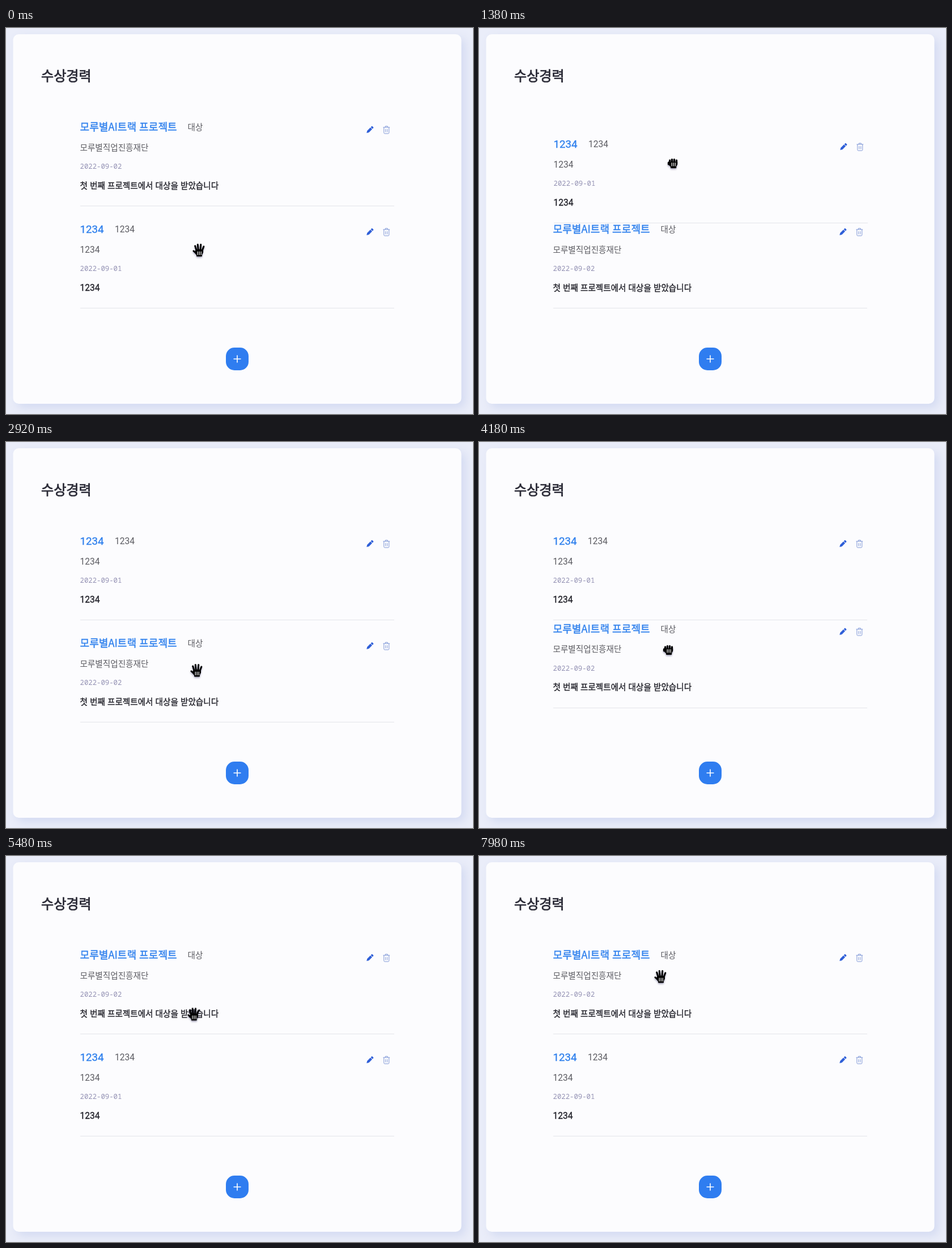
Recreate the animation shown at these times as an HTML page. Size 824 by 680 pixels, loop 8000 ms.

```html
<!DOCTYPE html>
<html lang="ko">
<head>
<meta charset="utf-8">
<title>수상경력</title>
<style>
html, body { margin: 0; width: 100%; height: 100%; overflow: hidden; background: #eaedf9; }
svg { display: block; width: 824px; height: 680px; }
.card { fill: #fcfcfe; filter: drop-shadow(7px 7px 8px #d3daf1); }

text { font-family: "Noto Sans CJK KR", "Noto Sans CJK", sans-serif; font-size: 14.6px; stroke-width: .35px; }
.heading { font-size: 24.1px; fill: #2c2c38; stroke: #2c2c38; stroke-width: .8px; }
.title { font-size: 18.1px; fill: #2f80ed; stroke: #2f80ed; }
.label { fill: #5b5b61; }
.date { font-family: "Noto Sans Mono", monospace; font-size: 12.3px; fill: #9492b4; }
.body { fill: #22222a; stroke: #22222a; }
.digits .label, .digits .body { font-family: Roboto, sans-serif; font-size: 15.6px; }
.digits .title { font-family: Roboto, sans-serif; font-size: 18.7px; }
.rule { stroke: #e4e5ea; }

.first { animation: first 8s infinite; }
.second { animation: second 8s infinite; }
.hand { animation: hand 8s infinite; }
.open { animation: open 8s step-end infinite; }
.fist { animation: fist 8s step-end infinite; }

@keyframes first {
  0% { transform: translate(0, 0); }
  10.9% { transform: translate(0, 0); animation-timing-function: cubic-bezier(.2, 0, 0, 1); }
  13.4% { transform: translate(0, 180px); }
  47.5% { transform: translate(0, 180px); animation-timing-function: ease-in; }
  52.25% { transform: translate(0, 155px); animation-timing-function: linear; }
  61% { transform: translate(0, 37.5px); animation-timing-function: ease-out; }
  65%, 100% { transform: translate(0, 0); }
}
@keyframes second {
  0% { transform: translate(0, 180px); }
  4.4% { transform: translate(0, 180px); animation-timing-function: ease-in-out; }
  17.25% { transform: translate(1px, 30px); }
  20% { transform: translate(1px, 30px); animation-timing-function: cubic-bezier(.2, 1, .1, 1); }
  23.75% { transform: translate(0, 0); }
  58.96% { transform: translate(0, 0); animation-timing-function: cubic-bezier(.2, 0, 0, 1); }
  61.46%, 100% { transform: translate(0, 180px); }
}
@keyframes hand {
  0% { transform: translate(340px, 391px); }
  4.4% { transform: translate(340px, 391px); animation-timing-function: ease-in-out; }
  17.25% { transform: translate(342px, 238px); }
  24% { transform: translate(342px, 238px); animation-timing-function: ease-in-out; }
  36.5% { transform: translate(336px, 402px); animation-timing-function: ease-in-out; }
  44% { transform: translate(333px, 391px); }
  47.5% { transform: translate(333px, 391px); animation-timing-function: ease-in; }
  52.25% { transform: translate(334px, 366px); animation-timing-function: linear; }
  61% { transform: translate(334px, 265px); }
  65% { transform: translate(334px, 265px); animation-timing-function: ease-in-out; }
  78.5% { transform: translate(311px, 360px); animation-timing-function: ease-in-out; }
  99.75%, 100% { transform: translate(320px, 212px); }
}
@keyframes open {
  0% { visibility: visible; }
  4% { visibility: hidden; }
  20.5% { visibility: visible; }
  46.5% { visibility: hidden; }
  62% { visibility: visible; }
}
@keyframes fist {
  0% { visibility: hidden; }
  4% { visibility: visible; }
  20.5% { visibility: hidden; }
  46.5% { visibility: visible; }
  62% { visibility: hidden; }
}
.hand { filter: drop-shadow(0 2px 1.5px rgba(40, 35, 90, .4)); stroke-linecap: round; stroke-linejoin: round; }
.hand .slots { stroke: #fff; stroke-width: 1.2; }
</style>
</head>
<body>
<svg viewBox="0 0 824 680">
  <defs>
    <g id="tools">
      <g transform="translate(641.8 179.5) rotate(45)" fill="#2f5fd8">
        <rect x="-2.2" y="-7.8" width="4.4" height="3.2" rx="1.1"/>
        <path d="M-2.2-3.8H2.2V4.2L0 7.8-2.2 4.2Z"/>
      </g>
      <g transform="translate(671.3 179.5)" fill="none" stroke="#7f97d6" stroke-linecap="round">
        <path d="M-5.5-4.5H5.5M-2-4.8V-6.5H2V-4.8M-4.5-4.2V5Q-4.5 6.5-3 6.5H3Q4.5 6.5 4.5 5V-4.2M-1.5-1V3.5M1.5-1V3.5"/>
      </g>
      <path class="rule" d="M131 313.5H685"/>
    </g>
  </defs>

  <rect class="card" x="12.5" y="11" width="791" height="651" rx="10"/>
  <text class="heading" x="62" y="93">수상경력</text>

  <g class="first">
    <text class="title" x="130.5" y="181">모루별AI트랙 프로젝트</text>
    <text class="label" x="320.5" y="180">대상</text>
    <text class="label" x="130.5" y="215.5">모루별직업진흥재단</text>
    <text class="date" x="130.5" y="248">2022-09-02</text>
    <text class="body" x="130.5" y="282.5">첫 번째 프로젝트에서 대상을 받았습니다</text>
    <use href="#tools"/>
  </g>

  <g class="second digits">
    <text class="title" x="130.5" y="181">1234</text>
    <text class="label" x="192" y="180">1234</text>
    <text class="label" x="130.5" y="215.5">1234</text>
    <text class="date" x="130.5" y="248">2022-09-01</text>
    <text class="body" x="130.5" y="282.5">1234</text>
    <use href="#tools"/>
  </g>

  <rect x="388" y="563" width="40" height="40" rx="15" fill="#2f7df0"/>
  <path d="M401.5 583H414.5M408 576.5V589.5" stroke="#fff" stroke-width="1.6"/>

  <g class="hand">
    <g class="open">
      <path d="M-3.8 1-6.3-7M-.8 0-1.7-9.5M3 0 3.7-9.5M6.2 1 8.8-6M-4.5 5.5-9 1.8" fill="none" stroke="#000" stroke-width="3"/>
      <path d="M-5 1Q1-1.5 7 1V4L5 8V10.5H-3V8.5L-6 5Z" stroke="#000" stroke-width="2"/>
      <path class="slots" d="M-1.8 3V8.5M1.2 3V8.5M4.2 3V8.5"/>
    </g>
    <g class="fist">
      <path d="M-5.3-5V0M-1.5-6.5V0M2.5-6.5V0M6.5-5V0M-7.5-1V2" fill="none" stroke="#000" stroke-width="3.2"/>
      <path d="M-7-1.5H7.2V2L5.2 5.5V8H-3V6L-7 2Z" stroke="#000" stroke-width="2"/>
      <path class="slots" d="M-1.8-.5V5M1.2-.5V5M4.2-.5V5"/>
    </g>
  </g>
</svg>
</body>
</html>
```
